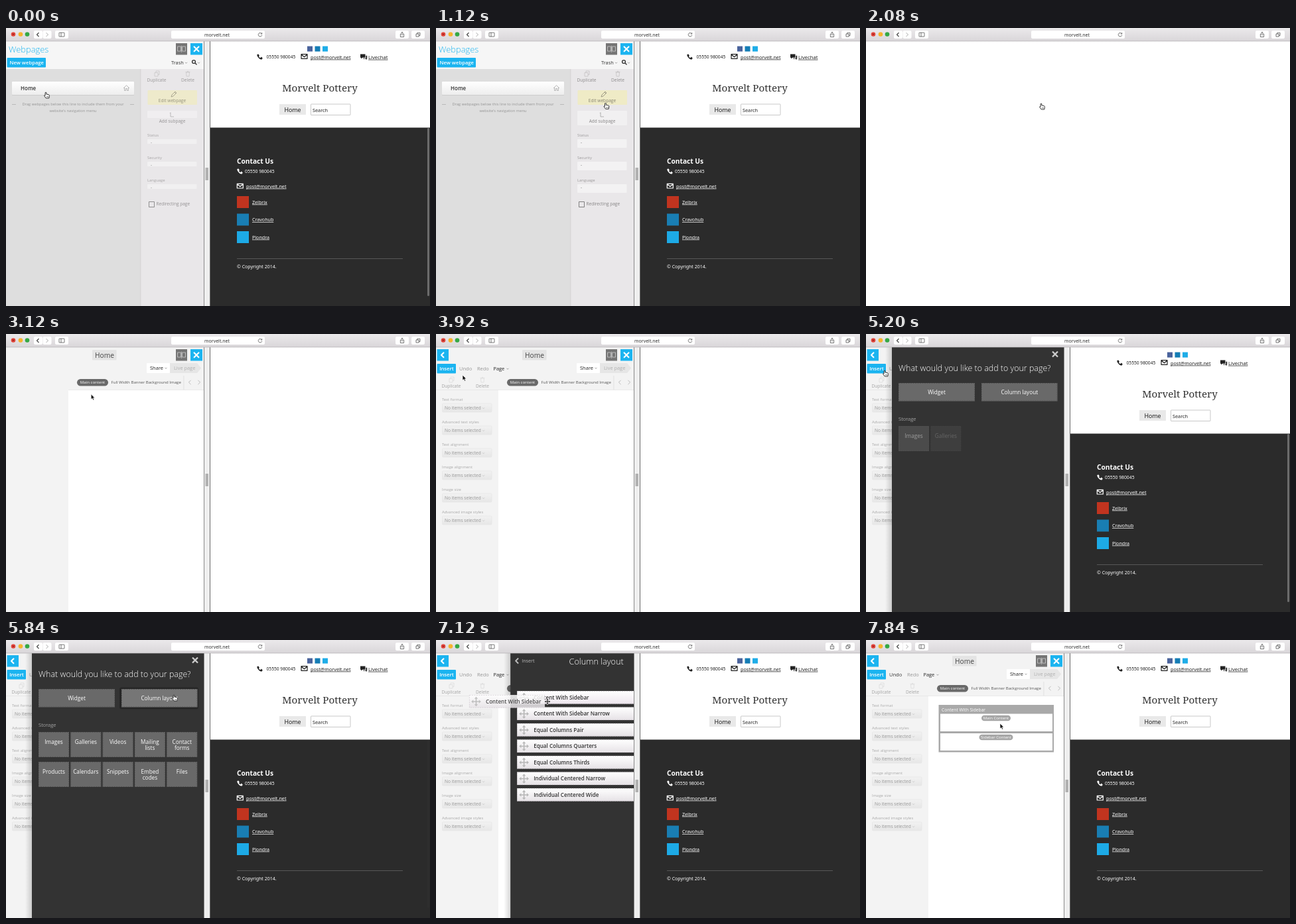
Animation, 639 px wide and 420 px high, one loop 8 s. Source, as an HTML page with a canvas:

```html
<!DOCTYPE html>
<html lang="en">
<head>
<meta charset="utf-8">
<title>Page builder demo</title>
<style>
html, body { margin: 0; width: 100%; height: 100%; overflow: hidden; background: #fff; }
canvas { display: block; width: 639px; height: 420px; }
</style>
</head>
<body>
<canvas id="stage" width="639" height="420"></canvas>
<script>
const ctx = document.getElementById('stage').getContext('2d');
const LOOP = 8000;
const SANS = '"Open Sans", sans-serif', SITE = '"Noto Sans", sans-serif', SERIF = '"Noto Serif", serif';
const CYAN = '#1bb4f0';
const PHONE = '05550 980045', EMAIL = 'post@morvelt.net';

const clamp = v => Math.max(0, Math.min(1, v));
const ramp = (t, from, to) => clamp((t - from) / (to - from));
const swing = p => 0.5 - Math.cos(p * Math.PI) / 2;
const mix = (a, b, p) => a + (b - a) * p;

function rect(x, y, w, h, fill, r = 0, stroke) {
  ctx.beginPath();
  ctx.roundRect(x, y, w, h, r);
  if (fill) { ctx.fillStyle = fill; ctx.fill(); }
  if (stroke) { ctx.strokeStyle = stroke; ctx.lineWidth = 0.8; ctx.stroke(); }
}

function dot(x, y, r, fill) {
  ctx.beginPath();
  ctx.arc(x, y, r, 0, 7);
  ctx.fillStyle = fill;
  ctx.fill();
}

function path(d, x, y, stroke, width = 1, fill) {
  ctx.save();
  ctx.translate(x, y);
  const p = new Path2D(d);
  if (fill) { ctx.fillStyle = fill; ctx.fill(p); }
  if (stroke) { ctx.strokeStyle = stroke; ctx.lineWidth = width; ctx.lineJoin = 'round'; ctx.stroke(p); }
  ctx.restore();
}

// y is the middle of the capital letters
function text(s, x, y, size, color, weight = 400, align = 'left', family = SANS) {
  ctx.font = `${weight} ${size}px ${family}`;
  ctx.textAlign = align;
  ctx.fillStyle = color;
  ctx.fillText(s, x, y + size * 0.36);
}

function link(s, x, y, size, color) {
  text(s, x, y, size, color, 400, 'left', SITE);
  ctx.fillRect(x, y + size * 0.36 + 1, ctx.measureText(s).width, 0.7);
}

function faded(alpha, draw) {
  if (alpha <= 0) return;
  ctx.save();
  ctx.globalAlpha *= alpha;
  draw();
  ctx.restore();
}

function clipped(x, y, w, h, draw) {
  ctx.save();
  ctx.beginPath();
  ctx.rect(x, y, w, h);
  ctx.clip();
  draw();
  ctx.restore();
}

function shade(y0, y1, top, bottom) {
  const g = ctx.createLinearGradient(0, y0, 0, y1);
  g.addColorStop(0, top);
  g.addColorStop(1, bottom);
  return g;
}

const caret = (x, y, color) => path('M-1.5-.7L0 .8 1.5-.7', x, y, color, 0.7);
const cross = (x, y, r, color, w) => path(`M${-r} ${-r}L${r} ${r}M${r} ${-r}L${-r} ${r}`, x, y, color, w);
const chevron = (x, y, dir, size, color, w) =>
  path(`M${dir * size * -0.5} ${-size}L${dir * size * 0.5} 0 ${dir * size * -0.5} ${size}`, x, y, color, w);

function browserBar() {
  rect(0, 0, 639, 20, shade(0, 20, '#ebe9eb', '#d9d6d9'));
  rect(0, 19.5, 639, 0.8, '#b6b3b6');
  dot(11, 9.5, 3.3, '#e8483e');
  cross(11, 9.5, 1.3, '#7b1510', 0.9);
  dot(22, 9.5, 3.3, '#f6b32c');
  dot(32, 9.5, 3.3, '#35a844');
  rect(42, 4, 13, 12, '#fff', 2);
  rect(55.5, 4, 13, 12, '#fff', 2);
  chevron(48, 10, -1, 3, '#444', 1.1);
  chevron(62, 10, 1, 3, '#aaa', 1);
  for (const x of [74, 587, 611]) rect(x, 4, 20, 12, '#fff', 2);
  rect(80, 7, 8, 6, null, 0.5, '#555');
  path('M83 7V13', 0, 0, '#555', 0.8);
  rect(249, 4, 141, 12, '#fff', 2);
  text('morvelt.net', 318, 10, 7, '#222', 400, 'center');
  path('M2.4-1.4A2.8 2.8 0 1 0 2.8.6M2.7-3V-1H.8', 383, 10, '#555', 0.8);
  path('M-1-1H-2.6V3.5H2.6V-1H1M0 1.5V-4M-1.5-2.6L0-4.1 1.5-2.6', 597, 10, '#555', 0.8);
  path('M-3-1H1.2V3H-3ZM-1.3-1V-2.8H3V1.4H1.2', 621, 10, '#555', 0.8);
}

const phoneIcon = (x, y, c) =>
  path('M-4-3.5L-2-4-.6-1.6-1.6-.6Q-.6 1.2 1 1.8L2-.1 4.2 1.8 3.4 3.8Q1 5-2 1.6-4.6-1.5-4-3.5Z', x, y, null, 0, c);
const mailIcon = (x, y, c) => path('M-4.5-3.3H4.5V3.3H-4.5ZM-4.5-3L0 .8 4.5-3', x, y, c, 1.2);

function website(barAlpha) {
  rect(308, 20, 331, 131, '#fff');
  ['#4a639c', '#147db5', '#1fade8'].forEach((c, i) => rect(454 + i * 11.5, 27.5, 8, 8, c));
  phoneIcon(382.5, 43.5, '#222');
  text(PHONE, 392.5, 44, 6.7, '#222', 400, 'left', SITE);
  mailIcon(449.5, 43, '#222');
  link(EMAIL, 459, 44, 7.2, '#222');
  path('M-5-4H2.5V1.3H-2L-4 3V1.3H-5ZM3.4-1.8H5.2V3H4.6V4.6L2.8 3H-1V2.2H3.4Z', 539, 43.5, null, 0, '#222');
  link('Livechat', 546, 44, 7.6, '#222');
  text('Morvelt Pottery', 473, 91, 15.2, '#333', 400, 'center', SERIF);
  rect(412, 115, 40, 16, '#e9e9e9');
  text('Home', 432, 123.5, 8.9, '#222', 400, 'center', SITE);
  rect(459.5, 115, 59.5, 16.5, '#fff', 0.5, '#bbb');
  text('Search', 462, 124, 7.3, '#222', 400, 'left', SITE);

  rect(307, 150.5, 332, 269.5, '#2b2b2b');
  text('Contact Us', 348, 201, 10.2, '#fff', 700, 'left', SITE);
  phoneIcon(352.5, 216.5, '#fff');
  text(PHONE, 360, 217, 6.8, '#fff', 400, 'left', SITE);
  mailIcon(352.8, 238.7, '#fff');
  link(EMAIL, 362, 239, 7.2, '#fff');
  [['Zelbrix', '#c1341f'], ['Cravohub', '#197eb3'], ['Plondra', '#1daae6']].forEach(([name, color], i) => {
    rect(348, 254 + i * 26.5, 18, 18, color);
    link(name, 371, 263 + i * 26.5, 7.1, '#fff');
  });
  rect(348, 348, 250, 1, '#575757');
  text('© Copyright 2014.', 348, 360, 7, '#fff', 400, 'left', SITE);
  faded(barAlpha, () => rect(635, 151, 3, 254, '#6c6c6c', 1.5));
}

function divider() {
  rect(298, 20, 10, 400, '#efefef');
  rect(298, 20, 1, 400, '#8a8a8a');
  rect(307, 20, 1, 400, '#6c6c6c');
  rect(300.5, 211, 4.5, 19, '#b2b2b2', 0.5);
}

function paneButtons() {
  rect(256, 23, 17, 17.5, '#757575');
  rect(258.5, 28, 5, 7, null, 0, '#ccc');
  rect(265.5, 28, 5, 7, null, 0, '#ccc');
  path('M264.5 26.5V37', 0, 0, '#ccc', 0.6);
  rect(278, 23, 18, 17.5, CYAN);
  cross(287, 31.7, 4, '#fff', 2.1);
}

function duplicateDelete(x, iconColor, color) {
  path('M-3-1.5H2V4H-3ZM-1-1.5V-4H4V1.5H2', x, 69, iconColor, 0.8);
  path('M-2.5-2H2.5L2 4H-2ZM-3.5-2.6H3.5M-1-3.6H1', x + 47, 69, iconColor, 0.8);
  text('Duplicate', x, 79, 6.6, color, 400, 'center');
  text('Delete', x + 47, 79, 6.6, color, 400, 'center');
}

function manager(t) {
  const on = ramp(t, 80, 400);
  rect(0, 20, 299, 42, '#f6f6f6');
  rect(0, 62, 203, 358, '#dedede');
  rect(203, 62, 96, 358, '#e9e7e9');
  rect(202.5, 62, 0.8, 358, '#d2d0d1');
  text('Webpages', 4, 32, 12.9, CYAN, 300);
  rect(1.5, 45, 58.5, 14.5, CYAN, 1);
  text('New webpage', 5.5, 52.3, 7.6, '#fff', 600);
  text('Trash', 249, 52, 7.4, '#333');
  caret(271.5, 52.5, '#777');
  path('M1 1L3.5 3.5M1.4-1A2.4 2.4 0 1 1-3.4-1 2.4 2.4 0 1 1 1.4-1', 284, 52, '#333', 1.4);
  caret(290.5, 52.5, '#777');

  rect(9, 82, 184, 20, '#cdcdcd', 1);
  rect(9, 81, 184, 20, shade(81, 101, '#fff', '#ededed'), 1);
  text('Home', 22, 91, 8, '#333', 600);
  path('M-4.5.5L0-4 4.5.5M-3-.5V4H-1V1H1V4H3V-.5', 181.5, 90.5, '#aaa', 0.8);
  rect(9, 115, 6, 0.7, '#aaa');
  rect(187, 115, 6, 0.7, '#aaa');
  text('Drag webpages below this line to include them from your', 101, 115, 5.75, '#959595', 400, 'center');
  text("website's navigation menu", 101, 124.7, 5.75, '#959595', 400, 'center');

  faded(mix(0.85, 1, on), () => {
    duplicateDelete(227, '#c4c2c3', '#8c8a8b');
    const pressed = t >= 1520 && t < 1680;
    rect(213.5, 94, 74.5, 22, pressed ? '#e2dba6' : '#efebc6', 1);
    path('M-4 4L-3 1 2-4 4-2-1 3ZM1-3L3-1', 253, 100, '#8d8a78', 0.8);
    text('Edit webpage', 250.5, 110, 6.6, '#85826f', 400, 'center');
    rect(213, 125, 75, mix(11, 22, on), '#f1f0f1', 1);
    path('M-2-3V3M-2 3H3M-3-2L-2-3.5', 250, 131, '#aaa', 0.9);
    text('Add subpage', 250.5, 141, 6.5, '#858384', 400, 'center');
    ['Status', 'Security', 'Language'].forEach((label, i) => {
      const y = 162 + i * 34;
      text(label, 213, y, 5.9, '#9b999a');
      rect(213, y + 6, 74.5, mix(7, 13, on), '#f3f2f3', 1);
      rect(218, y + 11, 2, 0.8, '#aaa');
    });
    rect(215.5, 262.5, 8, 8, null, 0, '#666');
    text('Redirecting page', 226.5, 266, 6.5, '#858384');
  });
}

const FIELDS = ['Text format', 'Advanced text styles', 'Text alignment', 'Image alignment', 'Image size', 'Advanced image styles'];

function editorTools(t) {
  rect(1.5, 23, 17.5, 17.5, CYAN);
  chevron(10, 31.7, -1, 4, '#fff', 2.1);
  rect(1.5, 45, 28.5, 14.5, CYAN, 1);
  text('Insert', 16, 52.3, 7.7, '#fff', 600, 'center');
  text('Undo', 35, 52, 7.5, t >= 7680 ? '#333' : '#959595');
  text('Redo', 62, 52, 7.4, '#959595');
  text('Page', 86.5, 52, 7.4, '#222');
  caret(108, 52.5, '#777');
  duplicateDelete(23, '#dcdcdc', '#a3a3a3');
  rect(0, 84, 94, 0.8, '#e4e4e4');
  FIELDS.forEach((label, i) => {
    const y = 98.5 + i * 34;
    text(label, 9, y, 5.9, '#a9a9a9');
    rect(9.5, y + 6.5, 74.5, 13, shade(y + 6, y + 20, '#f2f2f2', '#e6e6e6'), 1, '#e6e6e6');
    text('No items selected', 13, y + 13, 6.6, '#959595');
    caret(71.5, y + 13.5, '#bbb');
  });
}

function editorHeader() {
  rect(130, 24, 36.5, 15.5, '#e4e4e4', 1);
  text('Home', 148.5, 32, 10.2, '#444', 400, 'center');
  paneButtons();
  path('M247 44H288L294 51.5 288 59H247Z', 0, 0, null, 0, '#e6e6e6');
  text('Live page', 253, 51.5, 7.4, '#b0b0b0');
  rect(212, 44, 35, 15, '#fff', 1);
  text('Share', 217, 51.5, 7.5, '#222');
  caret(241, 51.5, '#777');
  rect(107, 68, 47, 10.5, '#696969', 5.2);
  text('Main content', 130.5, 73, 6.1, '#fff', 400, 'center');
  text('Full Width Banner Background Image', 158.5, 73, 6.1, '#555');
  rect(267.5, 63, 0.8, 21, '#ddd');
  chevron(277, 73, -1, 3.2, '#bbb', 1);
  chevron(291, 73, 1, 3.2, '#bbb', 1);
}

function pill(label, y, w) {
  rect(196 - w / 2, y - 4.3, w, 8.6, '#a6a6a6', 4.3);
  text(label, 196, y, 6.1, '#fff', 400, 'center');
}

function contentBlock() {
  rect(109.5, 98, 173.5, 71.5, '#a9a9a9');
  text('Content With Sidebar', 114, 105.3, 6.65, '#fff');
  rect(112, 111.5, 169, 26.5, '#fff');
  rect(112, 141, 169, 26, '#fff');
  pill('Main Content', 118, 44);
  pill('Sidebar Content', 147, 51);
}

function editor(t) {
  rect(0, 20, 299, 400, '#fff');
  rect(0, 20, 299, 64, '#f3f3f3');
  rect(0, 62, 94, 358, '#f3f3f3');
  rect(94, 84, 205, 0.8, '#e2e2e2');
  if (t >= 3000) editorHeader();
  faded(ramp(t, 3400, 3640), () => editorTools(t));
  if (t >= 7680) contentBlock();
}

function darkButton(x, y, w, h, lines, hot) {
  rect(x, y, w, h, hot ? '#767676' : '#696969');
  ctx.setLineDash([2, 1.5]);
  rect(x + 0.5, y + 0.5, w - 1, h - 1, null, 0, '#555');
  ctx.setLineDash([]);
  const top = lines.tile ? y + 15 : y + h / 2;
  lines.forEach((line, i) => text(line, x + w / 2, top + i * 9, 8.2, '#fff', 400, 'center'));
}

const TILES = 'Images,Galleries,Videos,Mailing lists,Contact forms,Products,Calendars,Snippets,Embed codes,Files'.split(',');

function insertMenu(x, t) {
  text('What would you like to add to your page?', x + 10, 52, 12.45, '#fff', 300);
  cross(x + 246, 30.5, 4, '#ccc', 2.4);
  darkButton(x + 10, 74, 115, 27.5, ['Widget']);
  const hot = t > 5700;
  if (hot) rect(x + 132, 71.5, 119, 33, 'rgba(0,0,0,.25)', 3);
  darkButton(x + 135, 74, 114.5, 27.5, ['Column layout'], hot);
  text('Storage', x + 10, 128, 7.7, '#ddd', 300);
  TILES.forEach((name, i) => faded(ramp(t, 5110 + i * 50, 5310 + i * 50), () => {
    const lines = name.split(' ');
    lines.tile = true;
    darkButton(x + 10 + (i % 5) * 48.3, i < 5 ? 139 : 184, 46, 38, lines);
  }));
}

function grip(x, y, s, color) {
  for (let k = 0; k < 4; k++) {
    ctx.save();
    ctx.translate(x, y);
    ctx.rotate(k * Math.PI / 2);
    ctx.scale(s, s);
    path('M-.8 0V-4H-2.6L0-7 2.6-4H.8V0Z', 0, 0, null, 0, color);
    ctx.restore();
  }
}

function layoutRow(name, x, y, w, hot) {
  rect(x, y, w, 19.5, shade(y, y + 19.5, '#fff', hot ? '#eee6ee' : '#e6e2e6'));
  ctx.setLineDash([2, 1.5]);
  rect(x + 0.4, y + 0.4, w - 0.8, 18.7, null, 0, '#cfc8cf');
  ctx.setLineDash([]);
  grip(x + 10.5, y + 10, 1.05, '#b8b8b8');
  text(name, x + 25, y + 9.8, 8.1, '#333', 600);
}

const LAYOUTS = ['Content With Sidebar', 'Content With Sidebar Narrow', 'Equal Columns Pair', 'Equal Columns Quarters',
  'Equal Columns Thirds', 'Individual Centered Narrow', 'Individual Centered Wide'];

function layoutMenu(x, t) {
  chevron(x + 10, 31.5, -1, 4, '#bbb', 1.8);
  text('Insert', x + 17, 31.5, 7.2, '#bbb');
  text('Column layout', x + 129.5, 32, 12.7, '#fff', 300, 'center');
  LAYOUTS.forEach((name, i) => layoutRow(name, x + 10, 77 + i * 24.5, 239, i === 0 && t > 6320));
}

function insertPanel(t) {
  const x = 299 - 260 * (swing(ramp(t, 4860, 5160)) - swing(ramp(t, 7000, 7340)));
  if (x > 298) return;
  clipped(0, 20, 298, 400, () => {
    const g = ctx.createLinearGradient(x - 10, 0, x, 0);
    g.addColorStop(0, 'rgba(0,0,0,0)');
    g.addColorStop(1, 'rgba(0,0,0,.16)');
    rect(x - 10, 20, 10, 400, g);
    rect(x, 20, 260, 400, '#333');
    clipped(x, 20, 260, 400, () => {
      const p = swing(ramp(t, 5900, 6160));
      if (p < 1) insertMenu(x - 260 * p, t);
      if (p > 0) layoutMenu(x + 260 * (1 - p), t);
    });
  });
}

const CURSOR = [[0, 60, 97], [600, 60, 97], [1200, 264, 114], [2520, 264, 114], [3400, 88, 84], [3920, 40, 62],
  [4240, 30, 56], [4720, 28, 55], [5280, 28, 55], [5700, 253, 83], [6280, 253, 83], [6720, 167, 87],
  [7040, 167, 87], [7120, 168, 93], [7520, 202, 126], [8000, 202, 126]];

function cursorAt(t) {
  const i = CURSOR.findIndex(k => k[0] > t);
  const a = CURSOR[i - 1], b = CURSOR[i], p = swing(ramp(t, a[0], b[0]));
  return [mix(a[1], b[1], p), mix(a[2], b[2], p)];
}

function cursor(t) {
  const [x, y] = cursorAt(t);
  if (t >= 7020 && t < 7680) faded(0.85, () => layoutRow(LAYOUTS[0], x - 118, y - 10, 114));
  if (t >= 6560 && t < 7680) {
    grip(x, y, 0.75, '#fff');
    grip(x, y, 0.62, '#111');
  } else if ((t >= 2600 && t < 4300) || t >= 7680) {
    path('M0 0V8L1.9 6.4 3.2 9.2 4.6 8.6 3.4 5.8H5.8Z', x, y, '#fff', 0.7, '#111');
  } else {
    path('M-.9.6Q0-.4.9.6V3L4.2 3.6Q5.6 4 5.4 5.6L4.8 9H.2L-2.4 5.4Q-2.6 4.2-.9 5Z', x, y, '#222', 0.9, '#fff');
    path('M1.2 6V7.6M2.5 6V7.6M3.7 6V7.6', x, y, '#222', 0.5);
  }
}

function draw(t) {
  rect(0, 0, 639, 420, '#fff');
  const managing = t < 2080;
  if (managing || t >= 4400) {
    website(managing ? 1 - ramp(t, 80, 900) : ramp(t, 4600, 4800) * (1 - ramp(t, 5400, 5860)));
  }
  if (managing) {
    manager(t);
    paneButtons();
  } else if (t >= 2560) {
    editor(t);
    insertPanel(t);
  }
  if (managing || t >= 2560) divider();
  browserBar();
  cursor(t);
}

function tick() {
  draw(performance.now() % LOOP);
  requestAnimationFrame(tick);
}
tick();
</script>
</body>
</html>
```
